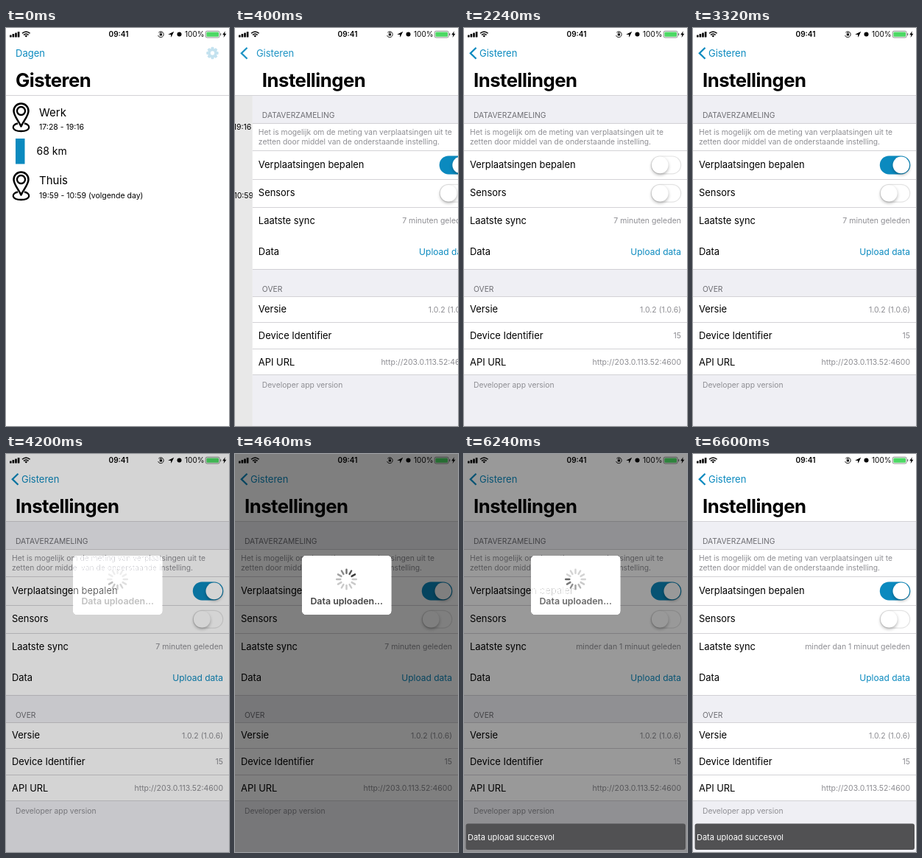
An HTML page with a canvas that plays this animation: 303x540 px, repeating every 6.64 s.

```html
<!DOCTYPE html>
<html lang="nl">
<head>
<meta charset="utf-8">
<title>Instellingen</title>
<style>
html, body { margin: 0; width: 100%; height: 100%; overflow: hidden; background: #fff; }
canvas { display: block; width: 303px; height: 540px; }
</style>
</head>
<body>
<canvas id="stage"></canvas>
<script>
const W = 303, H = 540, LOOP = 6640, NAV = 92;
const BLUE = '#0b8abf', GREY = '#8e8e93', PALE = '#efeff4', LINE = '#c8c7cc';
const canvas = document.getElementById('stage');
const c = canvas.getContext('2d');
const ratio = window.devicePixelRatio || 1;
canvas.width = W * ratio;
canvas.height = H * ratio;

const clamp = v => Math.max(0, Math.min(1, v));
const ramp = (t, from, to) => clamp((t - from) / (to - from));
const ease = p => p * p * (3 - 2 * p);
const mix = (a, b, p) => a + (b - a) * p;

function rect(x, y, w, h, color) {
  c.fillStyle = color;
  c.fillRect(x, y, w, h);
}

function round(x, y, w, h, r, color) {
  c.fillStyle = color;
  c.beginPath();
  c.roundRect(x, y, w, h, r);
  c.fill();
}

function stroke(path, color, width) {
  c.strokeStyle = color;
  c.lineWidth = width;
  c.stroke(new Path2D(path));
}

function fill(path, color) {
  c.fillStyle = color;
  c.fill(new Path2D(path));
}

function dot(x, y, r, color) {
  c.fillStyle = color;
  c.beginPath();
  c.arc(x, y, r, 0, 7);
  c.fill();
}

function text(s, x, y, size, color = '#000', align = 'left', weight = 400, spacing = 0) {
  c.font = `${weight} ${size}px Inter, Roboto, sans-serif`;
  c.letterSpacing = spacing + 'px';
  c.textAlign = align;
  c.fillStyle = color;
  c.fillText(s, x, y);
}

const heading = s => text(s, 13, 80, 25.7, '#000', 'left', 700, -0.5);

// Draw a group shifted sideways with its own opacity.
function group(dx, alpha, draw) {
  c.save();
  c.translate(dx, 0);
  c.globalAlpha *= alpha;
  draw();
  c.restore();
}

function statusBar() {
  for (let i = 0; i < 4; i++) round(5 + i * 3.6, 9.5 - i * 1.5, 2.6, 3 + i * 1.5, 0.6, '#000');
  stroke('M22 7.3Q27.3 2.6 32.6 7.3M24 9.4Q27.3 6.6 30.6 9.4', '#000', 1.5);
  fill('M25.4 10.6Q27.3 9 29.2 10.6L27.3 12.6Z', '#000');
  text('09:41', 153, 12.2, 10, '#000', 'center', 600);
  stroke('M207.3 6.2A3.9 3.9 0 1 1 206.6 10M209.4 8V7A1 1 0 0 1 211.4 7V8', '#000', 0.9);
  rect(208.8, 8, 3.2, 2.4, '#000');
  fill('M220.2 8.8L228.2 4.8L224.4 12.8L223.9 9.1Z', '#000');
  dot(235.5, 8.6, 3, '#000');
  text('100%', 243, 12.2, 10);
  c.strokeStyle = '#777';
  c.lineWidth = 0.8;
  c.beginPath();
  c.roundRect(271.2, 4.2, 19, 8.8, 2);
  c.stroke();
  round(272.4, 5.4, 16.6, 6.4, 1, '#4cd964');
  round(291, 7, 1.3, 3.2, 0.6, '#777');
  fill('M297.8 4.2L294.2 9.2H296.4L295.6 13L299.4 7.8H297.2Z', '#000');
}

function gear() {
  c.save();
  c.translate(280.5, 34);
  for (let i = 0; i < 8; i++) {
    c.rotate(Math.PI / 4);
    round(-2, -8.2, 4, 5, 1, '#c4e2ef');
  }
  dot(0, 0, 6.3, '#c4e2ef');
  dot(0, 0, 2.7, '#fff');
  c.restore();
}

function pin(y) {
  c.save();
  c.translate(20.5, y);
  c.lineJoin = 'round';
  stroke('M0 31C-3 24-10 17-10 10A10 10 0 0 1 10 10C10 17 3 24 0 31Z', '#000', 2.5);
  stroke('M5.5 10A5.5 5.5 0 1 1 -5.5 10A5.5 5.5 0 1 1 5.5 10', '#000', 2.3);
  stroke('M-4.5 27C-14 29-13 37.5 0 37.5S14 29 4.5 27', '#000', 2.3);
  c.restore();
}

function dayList() {
  rect(0, NAV, W, H - NAV, '#fff');
  pin(102.5);
  text('Werk', 45, 119.5, 15);
  text('17:28 - 19:16', 45, 138.3, 10.5);
  rect(13, 150, 12.5, 34.5, BLUE);
  text('68 km', 41.5, 172, 14);
  pin(195.5);
  text('Thuis', 45, 212, 15);
  text('19:59 - 10:59 (volgende day)', 45, 231, 10.5);
}

// on: 0..1 position, press: 0..1 knob stretch under the finger
function toggle(y, on, press) {
  const x = 253.8, w = 41.5, h = 25;
  round(x, y, w, h, h / 2, '#e3e3e3');
  c.save();
  c.globalAlpha *= on;
  round(x, y, w, h, h / 2, BLUE);
  c.restore();
  const s = (1 - on) * (1 - press);
  const iw = (w - 2.4) * s, ih = (h - 2.4) * s;
  round(x + (w - iw) / 2, y + (h - ih) / 2, iw, ih, ih / 2, '#fff');
  const knob = 22.6 + 5 * press;
  c.save();
  c.shadowColor = 'rgba(0,0,0,.3)';
  c.shadowBlur = 4 * ratio;
  c.shadowOffsetY = 2 * ratio;
  round(mix(x + 1.2, x + w - 1.2 - knob, on), y + 1.2, knob, 22.6, 11.3, '#fff');
  c.restore();
}

function settings(on, press, sync) {
  rect(0, NAV, W, H - NAV, PALE);
  rect(0, 129.5, W, 198, '#fff');
  rect(0, 364, W, 107, '#fff');
  for (const y of [129, 166, 205, 243, 327, 364, 399, 435, 470]) rect(0, y, W, 0.8, LINE);

  text('DATAVERZAMELING', 13, 121.5, 10.3, '#6d6d72');
  text('Het is mogelijk om de meting van verplaatsingen uit te', 8, 145, 10.3, GREY);
  text('zetten door middel van de onderstaande instelling.', 8, 157.5, 10.3, GREY);
  const rows = [
    ['Verplaatsingen bepalen', 189.5], ['Sensors', 228], ['Laatste sync', 265.5, sync],
    ['Data', 307.5], ['Versie', 386, '1.0.2 (1.0.6)'], ['Device Identifier', 421.7, '15'],
    ['API URL', 457.5, 'http://203.0.113.52:4600']
  ];
  for (const [label, y, value] of rows) {
    text(label, 8, y, 12.9);
    if (value) text(value, 295, y - 0.3, 10.5, GREY, 'right');
  }
  text('Upload data', 295, 308, 12, BLUE, 'right');
  toggle(173.4, on, press);
  toggle(211.7, 0, 0);
  text('OVER', 13, 358, 10.3, '#6d6d72');
  text('Developer app version', 13, 488, 10.3, GREY);
}

function navBar(rest) {
  const done = 1 - rest;
  rect(0, 0, W, NAV, '#fff');
  group(-90 * done, clamp(1 - done * 1.6), () => {
    text('Dagen', 13, 39, 13, BLUE);
    heading('Gisteren');
  });
  group(0, clamp(1 - done * 1.6), gear);
  if (done > 0) {
    group(0, done, () => stroke('M16.5 26.8L8.8 34.3L16.5 41.8', BLUE, 2.3));
    group(100 * rest, done, () => text('Gisteren', 21, 39, 13, BLUE));
    group(W * rest, 1, () => heading('Instellingen'));
  }
  rect(0, 91, W, 0.8, LINE);
}

function hud(t, alpha) {
  c.save();
  c.globalAlpha = alpha;
  rect(0, 0, W, H, 'rgba(0,0,0,.5)');
  // The panel brightens what lies under it while it fades.
  c.globalCompositeOperation = 'lighter';
  round(91.3, 138, 121, 80, 5, '#fff');
  c.globalCompositeOperation = 'source-over';
  text('Data uploaden...', 151.7, 203.5, 12.4, '#444', 'center', 600);
  const head = Math.floor((t - 4640) * 12 / 1000) + 26;
  c.translate(151.5, 170);
  for (let i = 0; i < 12; i++) {
    const age = (head - i + 120) % 12;
    c.save();
    c.rotate(i * Math.PI / 6);
    round(-1.2, -14.5, 2.4, 7.5, 1.2, `rgba(60,60,60,${Math.max(0.28, 1 - age * 0.13)})`);
    c.restore();
  }
  c.restore();
}

function toast(alpha) {
  group(0, alpha, () => {
    round(2.5, 501.5, 298.5, 35.5, 3, '#515153');
    text('Data upload succesvol', 5, 523.5, 11, '#fff');
  });
}

function draw(t) {
  c.setTransform(ratio, 0, 0, ratio, 0, 0);
  rect(0, 0, W, H, '#fff');

  // Critically damped push from the day list to the settings.
  const k = Math.max(0, t - 40) * 0.0116;
  const rest = t > 860 ? 0 : (1 + k) * Math.exp(-k);
  if (rest > 0) group(-91 * (1 - rest), 1, dayList);
  if (rest < 1) {
    rect(0, NAV, W * rest, H - NAV, `rgba(0,0,0,${0.1 * (1 - rest)})`);
    const on = 1 - ease(ramp(t, 1120, 1400)) + ease(ramp(t, 2420, 2700));
    const hold = (a, b) => ease(ramp(t, a, a + 120)) * (1 - ease(ramp(t, b, b + 200)));
    const press = hold(1000, 1180) + hold(2260, 2480);
    const sync = t < 6120 ? '7 minuten geleden' : 'minder dan 1 minuut geleden';
    group(W * rest, 1, () => settings(on, press, sync));
  }
  navBar(rest);
  statusBar();

  const shown = ramp(t, 4100, 4400) * (1 - ramp(t, 6180, 6480));
  if (shown > 0) hud(t, shown);
  if (t >= 6120) toast(ramp(t, 6120, 6220));
}

function tick() {
  draw(performance.now() % LOOP);
  requestAnimationFrame(tick);
}
tick();
</script>
</body>
</html>
```
